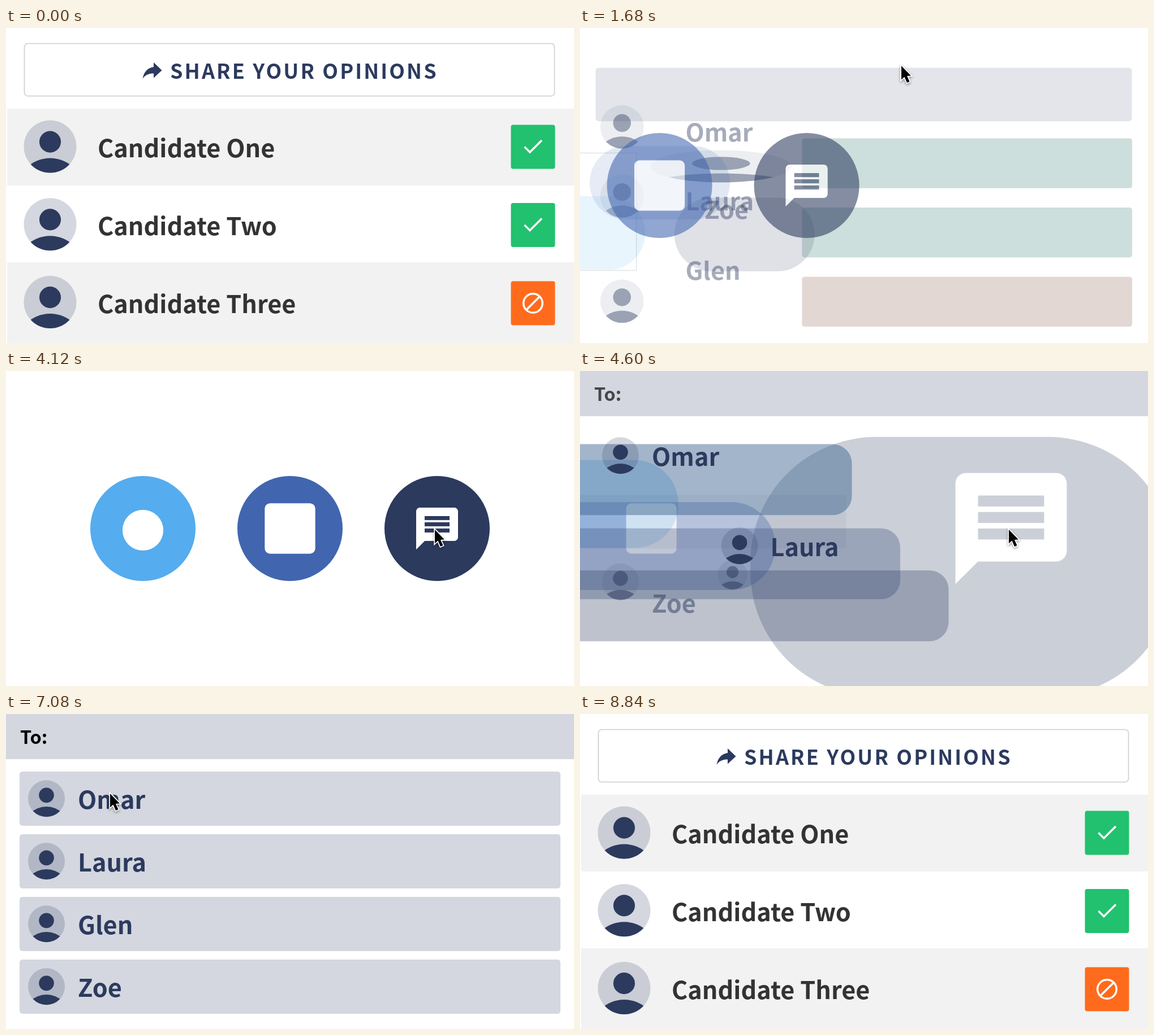
Animation of 1004x558 px, one loop 9.84 s. Source, as an HTML page with a canvas:

```html
<!DOCTYPE html>
<html lang="en">
<head>
<meta charset="utf-8">
<title>Share your opinions</title>
<style>
html, body { margin: 0; width: 100%; height: 100%; overflow: hidden; background: #fff; }
canvas { display: block; width: 1004px; height: 558px; }
</style>
</head>
<body>
<canvas id="stage" width="1004" height="558"></canvas>
<script>
const ctx = document.getElementById('stage').getContext('2d');
const LOOP = 9840, STEP = 40;
const FONT = '"Noto Sans CJK JP", "Noto Sans CJK SC", "Noto Sans", sans-serif';
const NAVY = [44, 58, 94], WHITE = [255, 255, 255], BLACK = [0, 0, 0], INK = [51, 51, 51];
const GREEN = [33, 193, 111], ORANGE = [255, 107, 28], SKY = [85, 172, 238], BLUE = [65, 102, 175];
const PALE = [242, 242, 242];
const BRANDS = [SKY, BLUE, NAVY];
const NAMES = ['Omar', 'Laura', 'Glen', 'Zoe'];
const ARROW = new Path2D('M261 61L275.5 75 261 88.5V80.5C252 80.5 246 83 241.5 90 243.5 79 249 71 261 69Z');
const POINTER = new Path2D('M0 0V24.5L5.5 19.5 10 30 14.5 28 10 18 17 17.5Z');

const clamp = v => Math.max(0, Math.min(1, v));
const lerp = (a, b, p) => a + (b - a) * p;
const mix = (a, b, p) => a.map((v, i) => lerp(v, b[i], p));
const rgb = c => `rgb(${c.map(Math.round)})`;
const smooth = u => u * u * (3 - 2 * u);

// Layout: boxes are [x, y, w, h, radius], faces [x, y, rx, ry], labels [x, baseline].
const square = (x, y, size, r) => [x, y, size, size, r];
const circle = x => square(x - 93, 186, 186, 93);
const circleX = i => 242 + 260 * i;
const contact = {
  box: i => [24, 102 + 111 * i, 956, 96, 5],
  face: i => [71.5, 149.7 + 111 * i, 32.5, 32.5],
  label: i => [127, 168 + 111 * i]
};
const candidate = {
  box: i => [2, 143 + 136 * i, 1002, 136, 0],
  face: i => [78, 210 + 137.75 * i, 46.5, 46.5],
  label: i => [162, 229 + 137.75 * i],
  vote: i => square(892.5, 171.5 + 138.5 * i, 78, 4)
};
const BUTTON = [32.5, 27.5, 937, 93, 6];
const BLOWN = [121, 83, 1024, 594, 285];
const SPARE_FACE = [674, 339, 13, 13];

// cubic-bezier(.25, .1, .25, 1)
function ease(x) {
  if (x <= 0) return 0;
  if (x >= 1) return 1;
  let lo = 0, hi = 1, s = x;
  for (let i = 0; i < 24; i++) {
    s = (lo + hi) / 2;
    if (0.75 * s * (1 - s) + s ** 3 < x) lo = s; else hi = s;
  }
  return 0.3 * s * (1 - s) ** 2 + 3 * s * s * (1 - s) + s ** 3;
}

function fill(path, color, alpha, rule = 'nonzero') {
  ctx.globalAlpha = clamp(alpha);
  ctx.fillStyle = rgb(color);
  ctx.fill(path, rule);
  ctx.globalAlpha = 1;
}

function stroke(path, color, alpha, width) {
  ctx.globalAlpha = clamp(alpha);
  ctx.strokeStyle = rgb(color);
  ctx.lineWidth = width;
  ctx.stroke(path);
  ctx.globalAlpha = 1;
}

function boxPath([x, y, w, h, r]) {
  const path = new Path2D();
  path.roundRect(x, y, w, h, r);
  return path;
}

function disc(x, y, r) {
  const path = new Path2D();
  path.arc(x, y, r, 0, 7);
  return path;
}

const box = (shape, color, alpha) => fill(boxPath(shape), color, alpha);

function text(str, [x, y], color, alpha, size = 43.2, spacing = 0) {
  ctx.globalAlpha = clamp(alpha);
  ctx.font = `bold ${size}px ${FONT}`;
  ctx.letterSpacing = spacing + 'px';
  ctx.fillStyle = rgb(color);
  ctx.fillText(str, x, y);
  ctx.globalAlpha = 1;
}

function avatar([x, y, rx, ry], alpha) {
  const rim = disc(0, 0, 1);
  ctx.save();
  ctx.translate(x, y);
  ctx.scale(rx, ry);
  fill(rim, NAVY, alpha * 0.2);
  ctx.clip(rim);
  fill(disc(0, 1.72, 1.28), NAVY, alpha);
  fill(disc(0, -0.18, 0.41), NAVY, alpha);
  ctx.restore();
}

function bubble(x, y, k) {
  const path = new Path2D(), raw = new Path2D();
  raw.roundRect(-37, -37, 74, 59, [7, 7, 7, 0]);
  raw.moveTo(-37, 22);
  raw.lineTo(-37, 37);
  raw.lineTo(-22, 22);
  for (let i = 0; i < 3; i++) raw.rect(-22, -22 + 11 * i, 44, 7.3);
  path.addPath(raw, new DOMMatrix([k, 0, 0, k, x, y]));
  return path;
}

// A coloured shape with its white icon, faded together.
function badge(kind, shape, ix, iy, alpha, k = 1) {
  const icon = kind === 0 ? disc(ix, iy + 3, 36)
    : kind === 1 ? boxPath(square(ix - 44.5, iy - 44.5, 89, 9))
    : bubble(ix, iy, k);
  const plate = boxPath(shape);
  plate.addPath(icon);
  fill(plate, BRANDS[kind], alpha, 'evenodd');
  fill(icon, WHITE, alpha, 'evenodd');
}

function shareLabel(alpha) {
  fill(ARROW, NAVY, alpha);
  text('SHARE YOUR OPINIONS', [290, 90], NAVY, alpha, 36, 3.1);
}

function voteMark(i, alpha) {
  const [x, y, size] = candidate.vote(i), c = size / 2;
  const mark = i < 2
    ? new Path2D('M-15 0L-5.5 9.5 15.5 -11.5')
    : new Path2D('M16.8 0A16.8 16.8 0 1 1 -16.8 0A16.8 16.8 0 1 1 16.8 0M-12 12L12 -12');
  ctx.save();
  ctx.translate(x + c, y + c);
  stroke(mark, WHITE, alpha, 3.5);
  ctx.restore();
}

function header(alpha, ink) {
  box([0, 0, 1004, 80, 0], NAVY, 0.2 * alpha);
  text('To:', [25, 52.5], BLACK, ink, 32.4);
}

function toCandidates(p) {
  const move = (a, b) => mix(a, b, p);
  const soon = clamp(p * 1.13), old = clamp(1 - p * 1.2);

  header(old, old);
  NAMES.forEach((name, i) => {
    box(contact.box(i), NAVY, 0.2 * old);
    avatar(contact.face(i), old);
    text(name, contact.label(i), NAVY, old);
  });

  box(move([593, 439, 393, 49, 0], candidate.box(0)), PALE, soon);
  box(move(contact.box(0), [2, 415, 1002, 143, 0]), mix(PALE, NAVY, 0.2 * (1 - p)), soon);

  const x = lerp(475, -90, p), y = lerp(70, 279, p);
  badge(2, square(x - 93, y - 93, 186, 93), x + 36 * (1 - p) / 0.115, y + 14, Math.min(0.1, 1 - p));

  const button = move(circle(-245), BUTTON);
  box(button, mix(NAVY, WHITE, p), soon);
  stroke(boxPath(button), [205, 205, 205], soon, 1.6);
  shareLabel(soon);

  const faces = [contact.face(3), SPARE_FACE, candidate.face(2)];
  const labels = [[624, 394], [32, 480], candidate.label(2)];
  const votes = [square(-290, 232, 88, 4), circle(3), BLOWN];
  ['One', 'Two', 'Three'].forEach((word, i) => {
    avatar(move(faces[i], candidate.face(i)), soon);
    text('Candidate ' + word, move(labels[i], candidate.label(i)), INK, soon);
    const color = i < 2 ? GREEN : ORANGE;
    box(move(votes[i], candidate.vote(i)), i ? mix(NAVY, color, p) : color, i ? soon : p ** 1.7);
    voteMark(i, soon);
  });
}

function toShare(p) {
  const move = (a, b) => mix(a, b, p);
  const fade = 1 - p, rows = clamp(1 - 3 * p);

  box(candidate.box(0), PALE, rows);
  box(candidate.box(2), PALE, rows);
  shareLabel(rows);

  NAMES.forEach((name, i) => {
    const from = i ? candidate.vote(i - 1) : BUTTON;
    const color = [WHITE, GREEN, GREEN, ORANGE][i];
    box(move(from, contact.box(i)), mix(color, NAVY, p), fade * (1 - 0.8 * p));
    const face = i === 2 ? [491, 73, 250, 23] : candidate.face(Math.min(i, 2));
    avatar(move(face, contact.face(i)), fade);
    const label = i < 3 ? [267, 246 + 137.75 * i] : [347, 117];
    text(name, move(label, contact.label(i)), NAVY, fade);
  });

  BRANDS.forEach((color, i) =>
    box(move([-515, [450, 240, 456][i], 332, 55, 28], circle(circleX(i))), color, 0.26 * p));
  const panel = boxPath([lerp(-1000, -306, p), 221.5, 700, 208, 1]);
  fill(panel, WHITE, 0.3 * fade);
  stroke(panel, [110, 120, 130], 0.45 * fade, 1.6);

  BRANDS.forEach((color, i) => {
    const x = circleX(i) - 852 * fade;
    badge(i, circle(x), x, 279, p);
  });
}

function toContacts(p) {
  const move = (a, b) => mix(a, b, p);
  const fade = 1 - p, soon = clamp(p * 1.6), late = p ** 1.7;

  if (p < 1) {
    badge(2, move(circle(circleX(2)), BLOWN), circleX(2), 279, fade * lerp(1, 0.62, p), 1 + 2.47 * p);
    for (let i = 0; i < 2; i++) {
      const away = [-520, 144 + 111 * i, 615 + 128 * i, 141, 70];
      badge(i, move(circle(circleX(i)), away), circleX(i) - 560 * p, 279, fade);
    }
  }

  header(soon, p);
  box(move([-1500, 233, 930, 93, 1], contact.box(1)), NAVY, 0.2 * p ** 3);
  BRANDS.forEach((color, i) => {
    const row = i ? i + 1 : 0;
    const alpha = (1 - 0.8 * p) * (i ? p : 1);
    box(move(circle(circleX(i) - 874), contact.box(row)), mix(color, NAVY, p), alpha);
  });

  const faces = [contact.face(0), [712, 410, 32.5, 32.5], SPARE_FACE, contact.face(0)];
  const labels = [contact.label(0), [764, 428], contact.label(2), contact.label(1)];
  NAMES.forEach((name, i) => {
    avatar(move(faces[i], contact.face(i)), i < 2 ? soon : late);
    const alpha = i < 2 ? soon : i === 2 ? (p - 0.68) * 3.2 : late;
    text(name, move(labels[i], contact.label(i)), NAVY, alpha);
  });
}

// Runs past the goal to the right, then circles back onto it.
function swoop(a, b, u) {
  const swing = (1 - u) * Math.sin(2 * Math.PI * u * u);
  const [x, y] = mix(a, b, smooth(clamp(u / 0.6)));
  return [x + 60 * swing, y - 80 * swing];
}

function cursor(t) {
  const button = [568, 67], icon = [758, 281], row = [184, 141];
  let pos, alpha = clamp((t - 440) / 300);
  if (t < 2560) pos = mix([906, 6], button, ease((t - 440) / 1000));
  else if (t < 5760) pos = swoop(button, icon, clamp((t - 2560) / 1560));
  else if (t < 8000) pos = mix(icon, row, ease((t - 5760) / 1320));
  else {
    pos = mix(row, [812, 5], ease((t - 8000) / 1000));
    alpha = clamp(1 - (t - 8000) / 840);
  }
  if (!alpha) return;
  ctx.save();
  ctx.translate(...pos);
  ctx.shadowColor = 'rgba(0,0,0,.4)';
  ctx.shadowBlur = 4;
  ctx.shadowOffsetY = 2;
  stroke(POINTER, WHITE, alpha, 3.4);
  ctx.shadowColor = 'transparent';
  fill(POINTER, BLACK, alpha);
  ctx.restore();
}

function draw(t) {
  ctx.fillStyle = '#fff';
  ctx.fillRect(0, 0, 1004, 558);
  if (t <= 1560) toCandidates(1);
  else if (t <= 4440) toShare(ease((t - 1560) / 360));
  else if (t <= 7360) toContacts(ease((t - 4440) / 408));
  else toCandidates(ease((t - 7360) / 400));
  cursor(t);
}

const start = performance.now();
function tick() {
  const t = (performance.now() - start) % LOOP;
  draw(Math.floor(t / STEP) * STEP);
  requestAnimationFrame(tick);
}
tick();
</script>
</body>
</html>
```
